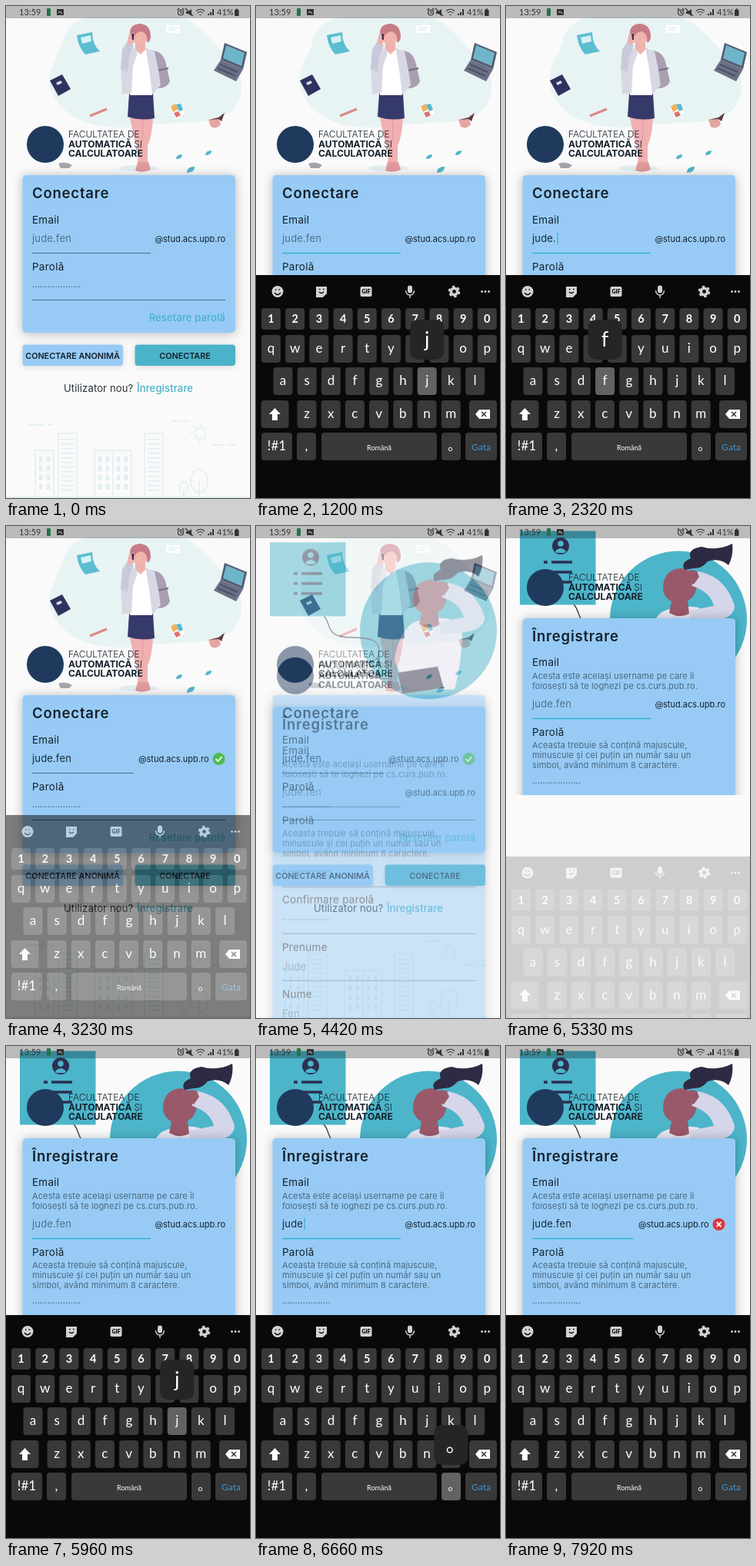
These frames come from a looping animation (317 by 640 pixels, 7990 ms). An HTML page:

```html
<!DOCTYPE html>
<html lang="ro">
<head>
<meta charset="utf-8">
<title>Conectare</title>
<style>
html, body { margin: 0; width: 100%; height: 100%; overflow: hidden; background: #fafafa; }
svg { display: block; width: 100%; height: 100%; }
text { font-family: Inter, sans-serif; fill: #14202b; white-space: pre; }

.title { font-size: 18.5px; font-weight: 600; letter-spacing: .8px; }
.label { font-size: 13.5px; letter-spacing: .25px; }
.input { font-size: 13px; letter-spacing: .15px; fill: #14283a; }
.hint { fill: #4f7089; }
.domain { font-size: 11px; text-anchor: end; }
.help { font-size: 11px; letter-spacing: .12px; fill: #48687f; }
.mask { font-size: 11.5px; fill: #3d5f78; }
.btn { font-size: 10.8px; font-weight: 600; text-anchor: middle; }
.note { font-size: 13px; letter-spacing: .15px; fill: #2b3238; }
.link { fill: #46b1cb; font-weight: 500; }
.brand { font-family: Roboto, sans-serif; font-size: 12px; fill: #2b2b33; }
.brand .thin { font-weight: 300; }
.brand .bold { font-weight: 700; }
.rule { stroke: #41637c; stroke-width: .9; }
.rule.on { stroke: #35b3d3; stroke-width: 1.3; }
.card { fill: #97cbf5; filter: drop-shadow(0 1px 7px rgba(0, 0, 0, .27)); }
.raised { filter: drop-shadow(0 1px 4px rgba(0, 0, 0, .14)); }
.city { fill: none; stroke: #deeef1; stroke-width: 1.3; }
.bar text { font-family: Lato, sans-serif; font-size: 11px; fill: #333; }
.keys text { font-family: Lato, sans-serif; font-size: 17px; fill: #fff; text-anchor: middle; }
.keys .digit { font-size: 14.5px; font-weight: 700; }
.keys .space { font-size: 9px; }
.keys .done { font-size: 12px; fill: #3d97d8; }
.keys .big { font-size: 27px; }
.key { fill: #393939; }
.key.down { fill: #626262; }

.keys { animation: keys 7990ms linear infinite; }
.cover { animation: cover 7990ms step-end infinite; }
.signup { animation: rise 7990ms infinite, appear 7990ms infinite; }
.scroll { animation: scroll 7990ms linear infinite; }

@keyframes keys {
  0%, 6.2% { opacity: 0; transform: translateY(120px); }
  8.01% { opacity: .35; transform: translateY(58px); }
  9.3% { opacity: .85; transform: translateY(12px); }
  10.64%, 36.92% { opacity: 1; transform: none; }
  39.1% { opacity: .85; transform: translateY(7px); }
  40.43% { opacity: .52; transform: translateY(26px); }
  43.05% { opacity: 0; transform: translateY(60px); }
  43.06%, 65% { opacity: 0; transform: translateY(125px); }
  66.71% { opacity: .18; transform: translateY(80px); }
  68% { opacity: .68; transform: translateY(28px); }
  69.34%, 100% { opacity: 1; transform: none; }
}
@keyframes cover {
  0% { opacity: 0; }
  7.1% { opacity: 1; }
  37.8% { opacity: 0; }
  64.9% { opacity: 1; }
}
@keyframes rise {
  0%, 51.94% { transform: translateY(160px); animation-timing-function: cubic-bezier(.4, 0, .2, 1); }
  57.2%, 100% { transform: none; }
}
@keyframes appear {
  0%, 51.94% { opacity: 0; animation-timing-function: ease-in; }
  57.2%, 100% { opacity: 1; }
}
@keyframes scroll {
  0%, 64.9% { transform: none; }
  66.3%, 100% { transform: translateY(-100px); }
}
</style>
</head>
<body>
<svg viewBox="0 0 317 640" preserveAspectRatio="none">
  <defs>
    <g id="brand" class="brand">
      <circle cx="51" cy="180" r="24" fill="#1f3a5c"/>
      <text class="thin" x="81" y="171">FACULTATEA DE</text>
      <text class="bold" x="81" y="183.500">AUTOMATICĂ <tspan class="thin">ȘI</tspan></text>
      <text class="bold" x="81" y="196">CALCULATOARE</text>
    </g>
    <path id="leaf" d="M-4 3Q-4-3 4-3Q4 3-4 3Z" fill="#53b5c9"/>
  </defs>
  <rect width="317" height="640" fill="#fafafa"/>

  <g id="login">
    <path fill="#e8f3f4" d="M57 105C54 75 70 66 74 44Q80 22 108 14H222C250 20 262 42 280 58C306 80 314 108 298 130C280 158 222 150 184 154C138 164 74 158 57 105Z"/>
    <ellipse cx="172" cy="211" rx="26" ry="4" fill="#e3eff2"/>
    <path fill="#5bbdd0" d="M92 38L112 34Q112 50 122 59L103 63Q94 54 92 38Z"/>
    <path fill="#d7f0f4" d="M97 41L110 38L111 46L99 49Z"/>
    <path fill="#2f325f" d="M57 97L73 89L84 108L68 117Z"/>
    <path fill="#d9dcec" d="M65 100L71 97L73 100L67 103Z"/>
    <path d="M109 143L131 134" stroke="#d98a86" stroke-width="3"/>
    <path fill="#fff" d="M208 25H226V35H208Z"/>
    <path d="M211 28H223M211 31H220" stroke="#cfe3e8"/>
    <path fill="#555b70" d="M284 48L313 60L308 82L279 70Z"/>
    <path fill="#6fb5ca" d="M286 51L310 61L306 78L282 68Z"/>
    <path fill="#6b7086" d="M279 70L308 82L299 98L270 84Z"/>
    <path d="M278 76L301 86M275 81L298 91" stroke="#4c5166" stroke-width="2"/>
    <path fill="#fff" d="M213 132L224 126L232 139L221 147Z"/>
    <path fill="#f0b25d" d="M214 131L220 127L224 134L217 138Z"/>
    <path fill="#59b9cf" d="M221 128L227 127L230 135L225 137Z"/>
    <path fill="#d9716f" d="M218 139L224 137L227 142L221 145Z"/>
    <path fill="#e3a5a1" d="M263 148L276 145L279 154Q273 161 266 157Z"/>
    <path fill="#5a3b43" d="M264 148L276 145L284 139L280 150L276 147Z"/>
    <use href="#leaf" x="225" y="196"/><use href="#leaf" x="263" y="191"/>
    <use href="#leaf" transform="translate(240 213) scale(1.300)"/>
    <path fill="#a3a6ad" d="M68 205Q77 201 86 207L82 211H71Z"/>
    <path fill="#a99fb0" d="M184 58Q204 56 208 76L213 98Q209 109 190 107Z"/>
    <path d="M187 60Q200 74 194 104M196 84L211 81" stroke="#7f768e" stroke-width="2.500" fill="none"/>
    <path fill="#f0b0b1" d="M161 145H191Q190 168 184 182L184 205H171Q173 186 167 174Z"/>
    <path d="M177 147Q180 170 174 186" stroke="#dd979c" fill="none"/>
    <path fill="#e19a9c" d="M171 203H185L188 213Q177 218 168 214Z"/>
    <path fill="#363a6b" d="M160 114H191L193 146Q176 150 158 144Z"/>
    <path fill="#fff" d="M163 55H187L190 116H161Z"/>
    <path fill="#efb1ad" d="M168 46H181V57L175 63L168 57Z"/>
    <ellipse cx="174" cy="39" rx="10" ry="12" fill="#efb4ac"/>
    <path fill="#c77c85" d="M161 37Q160 24 174 23Q188 24 188 40Q187 48 183 47Q185 36 176 33Q168 34 166 42Z"/>
    <path fill="#d8d8e4" d="M168 54L154 60L149 80L151 115L163 113L165 78L171 62ZM181 54L193 59L198 83L201 103L190 115L186 82Z"/>
    <path fill="#c9c9da" d="M149 82L151 56L159 45L166 51L160 66L158 86Z"/>
    <path fill="#efb1ad" d="M157 48L160 36L166 35L167 45L163 51Z"/>
    <path fill="#34375f" d="M163 36L166 36L166 44L164 44Z"/>
    <g class="city">
      <path d="M38 640V578H62V640M68 640V556H92V640M115 640V578H139V640M139 640V578H163V640M180 640V556H204V640M0 639H317"/>
      <path d="M45 586V634M55 586V634M122 586V634M132 586V634M146 586V634M156 586V634" stroke-width="4" stroke-dasharray="7 5"/>
      <path d="M80 563V634M192 563V634" stroke-width="16" stroke-dasharray="1.500 4.500"/>
      <path d="M231 640V626M251 640V618"/>
      <ellipse cx="231" cy="627" rx="6" ry="8"/><ellipse cx="251" cy="618" rx="11" ry="15"/>
      <circle cx="252" cy="556" r="7"/><circle cx="252" cy="556" r="11" stroke-width="3" stroke-dasharray="1.500 7.140"/>
      <path d="M27 545H50M54 545H62M215 540H226M229 540H239M268 571H284M288 571H299"/>
    </g>
    <use href="#brand"/>
    <rect class="card" x="21.500" y="220" width="276.500" height="205" rx="5"/>
    <text class="title" x="34" y="250">Conectare</text>
    <text class="label" x="34" y="283">Email</text>
    <text class="label" x="34" y="344">Parolă</text>
    <text class="mask" x="34" y="366">...................</text>
    <path class="rule" d="M34 382.500H285"/>
    <text class="note link" x="285" y="410" text-anchor="end">Resetare parolă</text>
    <g class="raised">
      <rect x="21.500" y="440.500" width="130.500" height="27.500" rx="4" fill="#97cbf5"/>
      <rect x="167.500" y="440.500" width="130.500" height="27.500" rx="4" fill="#4bb3c9"/>
    </g>
    <text class="btn" x="86.500" y="458.500">CONECTARE ANONIMĂ</text>
    <text class="btn" x="232.500" y="458.500">CONECTARE</text>
    <text class="note" x="75" y="502">Utilizator nou?</text>
    <text class="note link" x="170" y="502">Înregistrare</text>
  </g>

  <g class="signup">
    <rect width="317" height="800" fill="#fafafa"/>
    <circle cx="224" cy="121.500" r="89" fill="#4cb5ca"/>
    <path d="M88 102C98 112 90 128 118 130C150 130 162 134 160 150C158 168 134 156 138 170Q142 182 168 184" fill="none" stroke="#2c2c48" stroke-width="1.300"/>
    <rect x="18" y="6.500" width="98.500" height="96" fill="#4cb5ca"/>
    <g stroke="#2d2f52" stroke-width="3.500">
      <circle cx="71" cy="26" r="11" fill="#2d2f52" stroke="none"/>
      <path d="M49 47H54M59 47H86M49 60H54M59 60H86M49 73H54M59 73H86"/>
    </g>
    <path fill="#4cb5ca" d="M64 33Q71 25 78 33L76 35H66Z"/>
    <circle cx="71" cy="23" r="3.800" fill="#4cb5ca"/>
    <path fill="#e6e6f2" d="M202 112Q224 102 250 106L268 120Q268 160 258 198H196L180 160Q184 128 202 112Z"/>
    <path fill="#2d2d48" d="M184 176L236 168L244 196L190 203Z"/>
    <path fill="#99596a" d="M204 78Q206 56 228 55Q246 58 248 76Q247 92 236 97L238 114Q226 121 212 113L215 98Q203 92 204 78Z"/>
    <path fill="#2d2b43" d="M232 57Q226 48 240 42Q235 30 254 27Q274 33 294 23Q296 38 289 51Q278 41 262 46Q254 56 244 55Z"/>
    <path fill="#d6d6ea" d="M240 68L250 59Q286 66 297 104Q296 120 272 123L240 126L238 110L270 104Q266 86 242 78Z"/>
    <path fill="#99596a" d="M232 63Q238 54 248 59L251 66L244 76L235 72Z"/>
    <g class="scroll">
      <use href="#brand"/>
      <rect class="card" x="21.500" y="220" width="276.500" height="560" rx="5"/>
      <text class="title" x="34" y="250">Înregistrare</text>
      <text class="label" x="34" y="282">Email</text>
      <text class="help" x="34" y="299">Acesta este același username pe care îl</text>
      <text class="help" x="34" y="312">folosești să te loghezi pe cs.curs.pub.ro.</text>
      <g id="signupForm"></g>
      <text class="label" x="34" y="373">Parolă</text>
      <text class="help" x="34" y="389">Aceasta trebuie să conțină majuscule,</text>
      <text class="help" x="34" y="402">minuscule și cel puțin un număr sau un</text>
      <text class="help" x="34" y="415">simbol, având minimum 8 caractere.</text>
      <text class="mask" x="34" y="435">...................</text>
      <path class="rule" d="M34 454.500H285M34 515.500H285M34 576.500H285M34 637.500H285"/>
      <text class="label" x="34" y="476">Confirmare parolă</text>
      <text class="mask" x="34" y="498">...................</text>
      <text class="label" x="34" y="538">Prenume</text>
      <text class="input hint" x="34" y="563">Jude</text>
      <text class="label" x="34" y="599">Nume</text>
      <text class="input hint" x="34" y="624">Fen</text>
    </g>
  </g>

  <rect class="cover" y="350" width="317" height="290" fill="#fafafa"/>

  <g class="keys" id="keys">
    <rect y="350" width="317" height="420" fill="#090909"/>
    <g fill="#d2d2d2">
      <circle cx="28" cy="371.500" r="7.500"/>
      <path d="M78 365H92V374L87 379H78Z"/>
      <rect x="135.500" y="365" width="15" height="13" rx="2"/>
      <rect x="197" y="363.500" width="6" height="10" rx="3"/>
      <path d="M194.500 370Q195 376 200 376T205.500 370M200 376V380" fill="none" stroke="#d2d2d2" stroke-width="1.400"/>
      <circle cx="257.500" cy="371.500" r="4.200" fill="none" stroke="#d2d2d2" stroke-width="3.500"/>
      <circle cx="257.500" cy="371.500" r="6.500" fill="none" stroke="#d2d2d2" stroke-width="2.500" stroke-dasharray="3.400"/>
      <circle cx="293.500" cy="371.500" r="1.400"/><circle cx="298" cy="371.500" r="1.400"/><circle cx="302.500" cy="371.500" r="1.400"/>
    </g>
    <path d="M24 373Q28 378 32 373M25 369H26.500M29.500 369H31M82 372Q85 375 88 372M82 368.500H83.500M87 368.500H88.500" fill="none" stroke="#090909" stroke-width="1.400"/>
    <text x="143" y="374.300" style="font-size:7px;font-weight:900;fill:#090909">GIF</text>
  </g>

  <g class="bar">
    <rect width="317" height="16" fill="#000" fill-opacity=".25"/>
    <text x="17" y="12">13:59</text>
    <text x="274" y="12">41%</text>
    <g fill="#333">
      <rect x="53" y="3" width="5" height="10" rx="1" fill="#23744c"/>
      <path d="M66 4H75V12H66Z"/>
      <path d="M234 7H237L241 4V13L237 10H234Z"/>
      <path d="M262 12V10H264V12ZM265 12V8H267V12ZM268 12V4H270V12Z"/>
      <path d="M297 5H298.500V3.500H301V5H302.500V13H297Z"/>
    </g>
    <path d="M68 9L70 7L73 10M234 4L243 13" fill="none" stroke="#ddd"/>
    <g fill="none" stroke="#333" stroke-width="1.200">
      <circle cx="227" cy="8.500" r="3.500"/><path d="M227 6V9H229M222.500 5L225 3M231.500 5L229 3M233 3L243 13"/>
      <path d="M247 6.500Q252.500 2 258 6.500M249 9Q252.500 6 256 9M251.500 11.500H253.500"/>
    </g>
  </g>
</svg>

<script>
const LOOP = 7990, HOLD = 130, NAME = 'jude.fen';
const $ = id => document.getElementById(id);

function add(parent, tag, attrs, text = '') {
  const node = document.createElementNS('http://www.w3.org/2000/svg', tag);
  for (const k in attrs) node.setAttribute(k, attrs[k]);
  node.textContent = text;
  return parent.appendChild(node);
}

// Keyboard
const board = $('keys'), keys = {};

function addKey(label, cx, y, w = 25, h = 36, cls = '') {
  const rect = add(board, 'rect', { class: 'key', x: cx - w / 2, y, width: w, height: h, rx: 4 });
  add(board, 'text', { class: cls, x: cx, y: y + h / 2 + 5 }, label);
  keys[label] = { rect, cx, y };
}
function addRow(chars, x, y, h, cls) {
  [...chars].forEach((c, i) => addKey(c, x + i * 31.2, y, 25, h, cls));
}
addRow('1234567890', 19.5, 393, 28, 'digit');
addRow('qwertyuiop', 19.5, 428);
addRow('asdfghjkl', 35, 470);
addRow('zxcvbnm', 66, 513);
addKey('', 24.5, 513, 36);
addKey('', 295, 513, 36);
addKey('!#1', 27, 555, 40);
addKey(',', 65.5, 555);
addKey('Română', 160, 555, 150, 36, 'space');
addKey('｡', 253.5, 555);
addKey('Gata', 292.5, 555, 41, 36, 'done');
keys['.'] = keys['｡'];
add(board, 'path', { d: 'M24.500 523L32 531H28V539H21V531H17Z', fill: '#fff' });
add(board, 'path', { d: 'M285 531L290 525H304V537H290Z', fill: '#fff' });
add(board, 'path', { d: 'M293 528L299 534M299 528L293 534', stroke: '#393939', 'stroke-width': 1.6 });

const popup = add(board, 'g', {});
add(popup, 'rect', { x: -22, y: -62, width: 44, height: 52, rx: 10, fill: '#252525' });
const popupText = add(popup, 'text', { class: 'big', y: -27 });

// Email fields
function makeField(parent, y, good) {
  const input = add(parent, 'text', { x: 34, y });
  const value = add(input, 'tspan', {});
  const caret = add(input, 'tspan', { fill: '#2f9fd8' }, '|');
  const rule = add(parent, 'path', {});
  const domain = add(parent, 'text', { class: 'domain', y }, '@stud.acs.upb.ro');
  const badge = add(parent, 'g', { transform: `translate(276.500 ${y - 4})` });
  add(badge, 'circle', { r: 8, fill: good ? '#4fbb52' : '#df363c' });
  add(badge, 'path', {
    d: good ? 'M-4 0L-1 3L4-3' : 'M-3-3L3 3M3-3L-3 3',
    fill: 'none', stroke: '#fff', 'stroke-width': 1.8
  });
  return { y, input, value, caret, rule, domain, badge };
}

const forms = [
  { ui: makeField($('login'), 307, true), focus: [540, 2980], checked: 2665,
    presses: [1190, 1400, 1600, 1800, 1960, 2200, 2400, 2530] },
  { ui: makeField($('signupForm'), 336, false), focus: [5040, LOOP], checked: 7900,
    presses: [5880, 6060, 6220, 6380, 6650, 7080, 7440, 7700] }
];

const show = (node, on) => node.setAttribute('visibility', on ? 'visible' : 'hidden');

function drawField({ ui, focus, checked, presses }, t) {
  const typed = presses.filter(p => t >= p + HOLD).length;
  const done = t >= checked;
  const active = t >= focus[0] && t < focus[1];
  ui.input.setAttribute('class', typed ? 'input' : 'input hint');
  ui.value.textContent = typed ? NAME.slice(0, typed) : NAME;
  show(ui.caret, typed > 0 && typed < NAME.length);
  ui.rule.setAttribute('class', active ? 'rule on' : 'rule');
  ui.rule.setAttribute('d', `M34 ${ui.y + 14.5}H${done ? 166 : 188}`);
  ui.domain.setAttribute('x', done ? 263.5 : 285);
  show(ui.badge, done);
}

function pressedAt(t) {
  for (const { presses } of forms) {
    const i = presses.findIndex(p => t >= p && t < p + HOLD);
    if (i >= 0) return NAME[i];
  }
}

let start, held;
function draw(now) {
  start ??= now;
  const t = (now - start) % LOOP;
  forms.forEach(f => drawField(f, t));
  if (held) held.rect.classList.remove('down');
  const char = pressedAt(t);
  held = keys[char];
  show(popup, !!held);
  if (held) {
    held.rect.classList.add('down');
    popup.setAttribute('transform', `translate(${held.cx} ${held.y})`);
    popupText.textContent = char === '.' ? '｡' : char;
  }
  requestAnimationFrame(draw);
}
requestAnimationFrame(draw);
</script>
</body>
</html>
```
